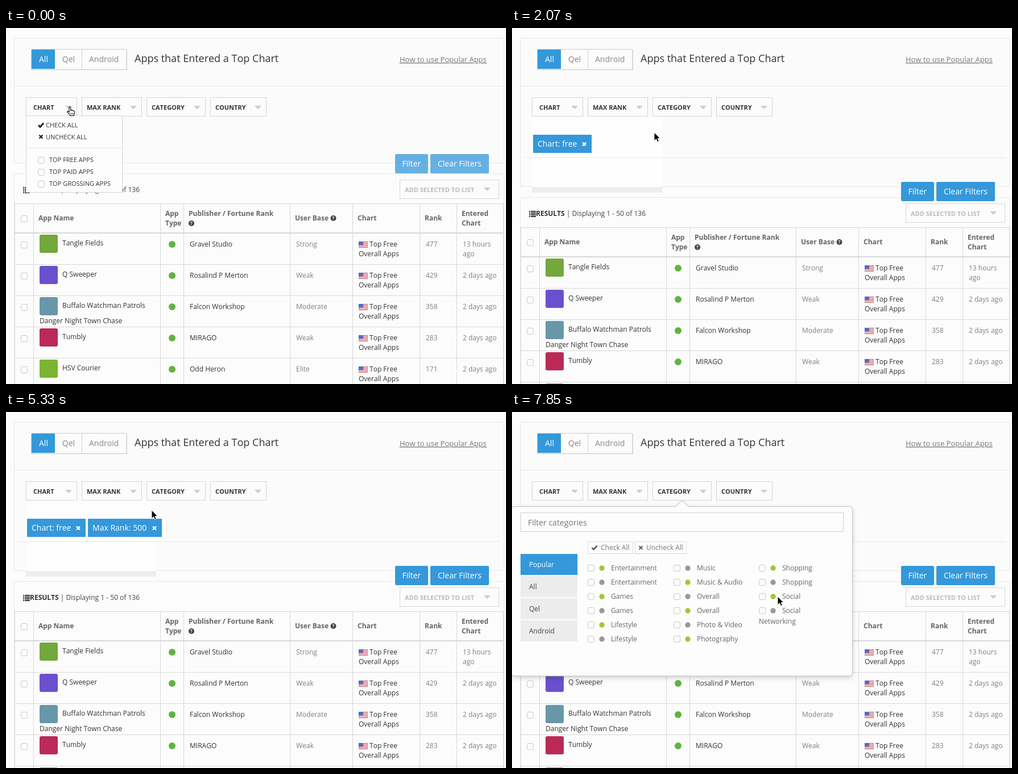
Recreate the animation shown at these times as an HTML page. Size 879 by 627 pixels, loop 7990 ms.

```html
<!DOCTYPE html>
<html lang="en">
<head>
<meta charset="utf-8">
<title>App chart filters</title>
<style>
html, body { margin: 0; width: 100%; height: 100%; overflow: hidden; background: #fcfcfc; }
svg { display: block; width: 879px; height: 627px; font-family: "Open Sans", "Noto Sans", sans-serif; font-kerning: none; }
text { white-space: pre; }
.menu { font-family: Inter, Roboto, sans-serif; font-weight: 500; }
.drop { filter: drop-shadow(0 3px 4px rgba(0,0,0,.16)); }
.halo { filter: drop-shadow(0 3px 5px rgba(0,0,0,.3)); }
</style>
</head>
<body>
<svg id="stage" viewBox="0 0 879 627"></svg>
<script>
const LOOP = 7990, TICKS = 54, BLUE = '#3498db', LINE = '#d8d8d8';
const stage = document.getElementById('stage');

// Drawing helpers
const text = (x, y, s, size = 12, fill = '#333', more = '') =>
  `<text x="${x}" y="${y}" font-size="${size}" fill="${fill}" ${more}>${s.replace(/&/g, '&amp;')}</text>`;
const bold = (x, y, s, size = 12, fill = '#666') => text(x, y, s, size, fill, 'font-weight="700"');
const rect = (x, y, w, h, fill, more = '') =>
  `<rect x="${x}" y="${y}" width="${w}" height="${h}" fill="${fill}" ${more}/>`;
const box = (x, y, w, h, fill, stroke, r = 0) =>
  rect(x + .5, y + .5, w - 1, h - 1, fill, `stroke="${stroke}" rx="${r}"`);
const path = (d, fill, more = '') => `<path d="${d}" fill="${fill}" ${more}/>`;
const dot = (x, y, r, fill) => `<circle cx="${x}" cy="${y}" r="${r}" fill="${fill}"/>`;
const group = (id, body) => `<g id="${id}">${body}</g>`;
const caret = (x, y) => path(`M${x - 6} ${y}h12l-6 6z`, '#ccc');
const tick = (x, y, c, w = 2.4) =>
  path(`M${x - 4.5} ${y}l3 3.2 6-6.6`, 'none', `stroke="${c}" stroke-width="${w}"`);
const cross = (x, y, c, r = 3) =>
  path(`M${x - r} ${y - r}l${2 * r} ${2 * r}m0 ${-2 * r}l${-2 * r} ${2 * r}`, 'none', `stroke="${c}" stroke-width="2.3"`);
const check = (x, y) => box(x, y, 12, 12, '#fdfdfd', '#c8c8c8', 2.5);
const help = (x, y) => dot(x, y, 5, '#444') + text(x, y + 3, '?', 8, '#fff', 'font-weight="700" text-anchor="middle"');
const join = (list, draw) => list.map(draw).join('');

function flag(x, y) {
  let s = rect(x, y, 16, 11, '#fff');
  for (let i = 0; i < 6; i++) s += rect(x, y + i * 2, 16, 1, '#e2555c');
  return s + rect(x, y, 8, 6, '#4a72c4') + box(x, y, 16, 11, 'none', 'rgba(90,90,120,.3)');
}

function header() {
  let s = rect(14, 102, 862, 1, '#e8e8e8');
  s += box(44, 37, 168, 37, '#fcfcfc', '#ccc', 1) + rect(211, 38, 2, 36, LINE) + rect(45, 73, 168, 1, '#c6c6c6');
  s += rect(45, 38, 41, 34, BLUE) + rect(133, 38, 1, 35, '#d2d2d2');
  s += text(58, 60, 'All', 14, '#fff') + text(110, 60, 'Qel', 14, '#888', 'text-anchor="middle"');
  s += text(146, 60, 'Android', 14, '#888') + text(226, 60, 'Apps that Entered a Top Chart', 18);
  return s + text(692, 60, 'How to use Popular Apps', 13, '#777', 'text-decoration="underline"');
}

function selects() {
  let x = 35, s = '';
  for (const [w, pad, label] of [[90, 13, 'CHART'], [106, 9, 'MAX RANK'], [104, 9, 'CATEGORY'], [99, 9, 'COUNTRY']]) {
    s += box(x, 122, w, 34, '#fcfcfc', '#d4d4d4') + bold(x + pad, 144, label, 11, '#333') + caret(x + w - 15, 137);
    x += w + 8;
  }
  return s;
}

const chip = (id, x, w, s) =>
  group(id, rect(x, 188, w, 32, BLUE) + text(x + 8, 209, s, 14, '#fff') + cross(x + w - 13, 204.5, '#fff'));

const rows = [
  ['Tangle Fields', '', '#73a83c', 'Gravel Studio', 'Strong', '477'],
  ['Q Sweeper', '', '#6a50cc', 'Rosalind P Merton', 'Weak', '429'],
  ['Buffalo Watchman Patrols', 'Danger Night Town Chase', '#6797a8', 'Falcon Workshop', 'Moderate', '358'],
  ['Tumbly', '', '#b92a58', 'MIRAGO', 'Weak', '283'],
  ['HSV Courier', '', '#7cb52f', 'Odd Heron', 'Elite', '171']
];

function results() {
  let s = box(14, 256, 862, 420, '#fcfcfc', '#e8e8e8');
  for (let y = 280; y < 291; y += 3) s += rect(30, y, 2, 2, '#333') + rect(33, y, 9, 2, '#333');
  s += bold(42, 289, 'RESULTS', 12, '#333') + text(235, 289, '| Displaying 1 - 50 of 136', 12, '#444', 'text-anchor="end"');
  s += box(692, 267, 175, 34, '#fcfcfc', '#d6d6d6') + bold(701, 289, 'ADD SELECTED TO LIST', 11, '#bbb') + caret(846, 281);
  s += rect(15, 309, 860, 1, LINE) + rect(15, 360, 860, 2, LINE);
  s += join([15, 48, 271, 312, 499, 609, 727, 792, 874], x => rect(x, 309, 1, 330, LINE));
  s += check(26, 330) + bold(57, 339, 'App Name') + bold(280, 331, 'App') + bold(280, 348, 'Type');
  s += bold(321, 331, 'Publisher / Fortune Rank') + help(326, 344) + bold(508, 339, 'User Base') + help(575.5, 335);
  s += bold(618, 339, 'Chart') + bold(736, 339, 'Rank') + bold(801, 331, 'Entered') + bold(801, 348, 'Chart');
  return s + join(rows, ([name, more, color, maker, base, rank], i) => {
    const y = 361 + i * 55, grey = (x, dy, label) => text(x, y + dy, label, 12, '#808080');
    return rect(15, y + 55, 860, 1, LINE) + check(26, y + 15) + rect(59, y + 3, 32, 32, color, 'rx="3"') +
      text(99, y + 22, name) + text(59, y + 49, more) + dot(292, y + 20, 6, '#65b144') +
      text(323, y + 24, maker) + grey(510, 24, base) + flag(620, y + 15) +
      text(639, y + 24, 'Top Free') + text(620, y + 41, 'Overall Apps') + grey(738, 24, rank) +
      grey(803, 24, i ? '2 days ago' : '13 hours') + grey(803, 41, i ? '' : 'ago');
  });
}

const buttons = rect(684, 222, 58, 34, BLUE, 'rx="2"') + rect(746, 222, 103, 34, BLUE, 'rx="2"') +
  text(696.5, 244, 'Filter', 14, '#fff') + text(759, 244, 'Clear Filters', 14, '#fff');

const dropLabels = ['CHECK ALL', 'UNCHECK ALL', 'TOP FREE APPS', 'TOP PAID APPS', 'TOP GROSSING APPS'];
const dropTop = i => 160 + 21 * i + (i > 1 ? 19 : 0);

function dropdown() {
  return box(35, 154, 170, 136, '#fdfdfd', '#d4d4d4') +
    rect(36, 211, 168, 1, '#e3e3e3') + group('dropBar', rect(36, 0, 168, 21, '#2f8fdb')) +
    join(dropLabels, (label, i) =>
      text(i < 2 ? 70 : 76, dropTop(i) + 15, label, 11, '#333', 'class="dropItem"') + (i < 2 ? '' : check(56, dropTop(i) + 6))) +
    tick(61.5, 171, '#222', 3) + cross(61.5, 191.5, '#222') + group('ticked', tick(61.5, 233.5, '#444', 2));
}

function rankMenu() {
  return `<g class="halo">${box(122, 125, 104, 106, '#f0f0f0', '#c4c4c4', 5)}</g>` +
    group('rankBar', rect(123, 130, 102, 16, '#4b95fa')) +
    join(['MAX RANK', '10', '50', '100', '500', '1000'], (label, i) =>
      text(144, 142 + i * 16, label, 11, '#222', 'class="menu rankItem"')) +
    path('M129 138.500l2.800 3.500 5-8', 'none', 'id="rankTick" stroke="#222" stroke-width="1.8"');
}

function categories() {
  let s = `<g class="drop">${path('M-1 172.500q0-6 6-6H288l11-10 11 10h282.500q6 0 6 6v286.500q0 6-6 6H5q-6 0-6-6z', '#fdfdfd', 'stroke="#bdbdbd"')}</g>`;
  s += box(15, 177, 568, 34, '#fdfdfd', '#c9d5de') + text(28, 200, 'Filter categories', 14, '#777');
  s += join([[133, 80], [216, 91]], ([x, w]) => box(x, 228, w, 22, '#fdfdfd', '#dedede') + rect(x, 249, w, 1, '#cfcfcf'));
  s += tick(145, 239, '#555', 2.5) + text(156, 243, 'Check All', 12, '#777');
  s += cross(226.5, 239, '#666') + text(236, 243, 'Uncheck All', 12, '#777');
  s += join(['Popular', 'All', 'Qel', 'Android'], (label, i) =>
    rect(15, 250 + i * 39, 100, 37, i ? '#ececec' : BLUE) + text(30, 273 + i * 39, label, 12, i ? '#444' : '#fff'));
  const columns = [
    ['Entertainment', 'Entertainment', 'Games', 'Games', 'Lifestyle', 'Lifestyle'],
    ['Music', 'Music & Audio', 'Overall', 'Overall', 'Photo & Video', 'Photography'],
    ['Shopping', 'Shopping', 'Social', 'Social']
  ];
  s += join(columns, (labels, c) => join(labels, (label, i) => {
    const x = Math.round(133 + c * 150.5), y = 275 + i * 25;
    return check(x, y - 6) + dot(x + 25, y, 4.7, (i + c) % 2 ? '#999' : '#9cc83a') + text(x + 41, y + 4, label, 12, '#666');
  }));
  return s + text(434, 373, 'Networking', 12, '#666');
}

const hand = path('M4 9.500V2.300a1.400 1.400 0 0 1 2.800 0V7q1.600-1 2.400.4 1.600-.7 2.200.6 2-.4 2 1.600V12q0 2-1.400 4.500H6Q4.200 13.600 1.200 10.600.2 9 1.600 8.600 2.800 8.600 4 10.200Z', '#fff', 'stroke="#000" stroke-width="1.1"') +
  path('M6.800 11.500v3m2-3v3m2-3v3', 'none', 'stroke="#000" stroke-width=".8"');
const pointer = path('M0 0V14.500L3.500 11.400 5.800 16.600 8.300 15.500 6 10.500H10.500Z', '#000', 'stroke="#fff" stroke-width=".9"');

stage.innerHTML =
  '<rect id="frame" x="14.500" y="17.500" width="861" fill="#fbfbfb" stroke="#e8e8e8"/>' +
  header() + selects() +
  group('stain', rect(35, 156, 229, 124, '#fefefe')) +
  group('rule', rect(23, 228, 844, 1, '#e8e8e8')) +
  group('results', results()) +
  group('stainFoot', rect(35, 280, 229, 10, '#eee')) +
  chip('chipChart', 37, 103, 'Chart: free') + chip('chipRank', 144, 130, 'Max Rank: 500') +
  group('buttons', buttons) + group('dropdown', dropdown()) + group('rankMenu', rankMenu()) +
  group('categories', categories()) +
  group('cursor', group('hand', hand) + group('pointer', pointer));

// Moments of the story, in ticks
const PICK = 9, CLOSE = 14, OPEN_RANK = 19, PICK_RANK = 34, OPEN_CATEGORIES = 40;

// Cursor moves: first tick, last tick, end point, sag of the path
const moves = [
  { from: 1, to: 8, x: 115, y: 232 },
  { from: 10, to: 14, x: 250, y: 184 },
  { from: 14, to: 18, x: 214, y: 133 },
  { from: 21, to: 30, x: 209, y: 201 },
  { from: 34, to: 38, x: 303, y: 145 },
  { from: 40, to: 47, x: 316, y: 300 },
  { from: 47, to: 53, x: 467, y: 325, sag: 20 }
];

function cursorAt(n) {
  let x = 107, y = 138;
  for (const m of moves) {
    const p = Math.min(Math.max((n - m.from) / (m.to - m.from), 0), 1);
    x += (m.x - x) * p;
    y += (m.y - y) * p + (m.sag || 0) * Math.sin(Math.PI * p);
    if (p < 1) break;
  }
  return [Math.round(x), Math.round(y)];
}

const el = id => document.getElementById(id);
const show = (id, on) => el(id).style.display = on ? '' : 'none';
const move = (id, x, y) => el(id).setAttribute('transform', `translate(${x} ${y})`);
const highlight = (selector, chosen, color) => document.querySelectorAll(selector)
  .forEach((node, i) => node.setAttribute('fill', i === chosen ? '#fff' : color));

function draw(n) {
  const filtered = n >= PICK, dropOpen = n < CLOSE, stained = !dropOpen && n < OPEN_CATEGORIES;
  const [x, y] = cursorAt(n);
  const onHand = n < 12 || (n >= 38 && n <= 40);

  el('frame').setAttribute('height', filtered ? 262 : 220);
  move('results', 0, filtered ? 42 : 0);
  move('buttons', 0, filtered ? 49 : 0);
  el('buttons').setAttribute('opacity', filtered ? 1 : .75);
  show('rule', filtered);
  show('chipChart', filtered);
  show('chipRank', n >= PICK_RANK);
  show('stain', stained);
  show('stainFoot', stained);

  show('dropdown', dropOpen);
  show('ticked', filtered);
  const hover = x < 192 ? dropLabels.findIndex((_, i) => y + 2 >= dropTop(i) && y + 2 < dropTop(i) + 21) : -1;
  show('dropBar', hover >= 0);
  move('dropBar', 0, dropTop(hover));
  highlight('.dropItem', hover, '#333');

  // The highlighted rank lags a little behind the cursor
  const rank = Math.max(0, Math.floor((y - 136) / 16));
  show('rankMenu', n >= OPEN_RANK && n < PICK_RANK);
  move('rankBar', 0, rank * 16);
  highlight('.rankItem', rank, '#222');
  el('rankTick').setAttribute('stroke', rank ? '#222' : '#fff');

  show('categories', n >= OPEN_CATEGORIES);
  el('categories').setAttribute('opacity', 1 - .35 ** Math.max(0, n - OPEN_CATEGORIES + 1));

  move('cursor', x, y);
  show('hand', onHand);
  show('pointer', !onHand);
}

const start = performance.now();
function play() {
  const t = (performance.now() - start) % LOOP;
  draw(Math.floor(t / LOOP * TICKS + .1));
  requestAnimationFrame(play);
}
play();
</script>
</body>
</html>
```
